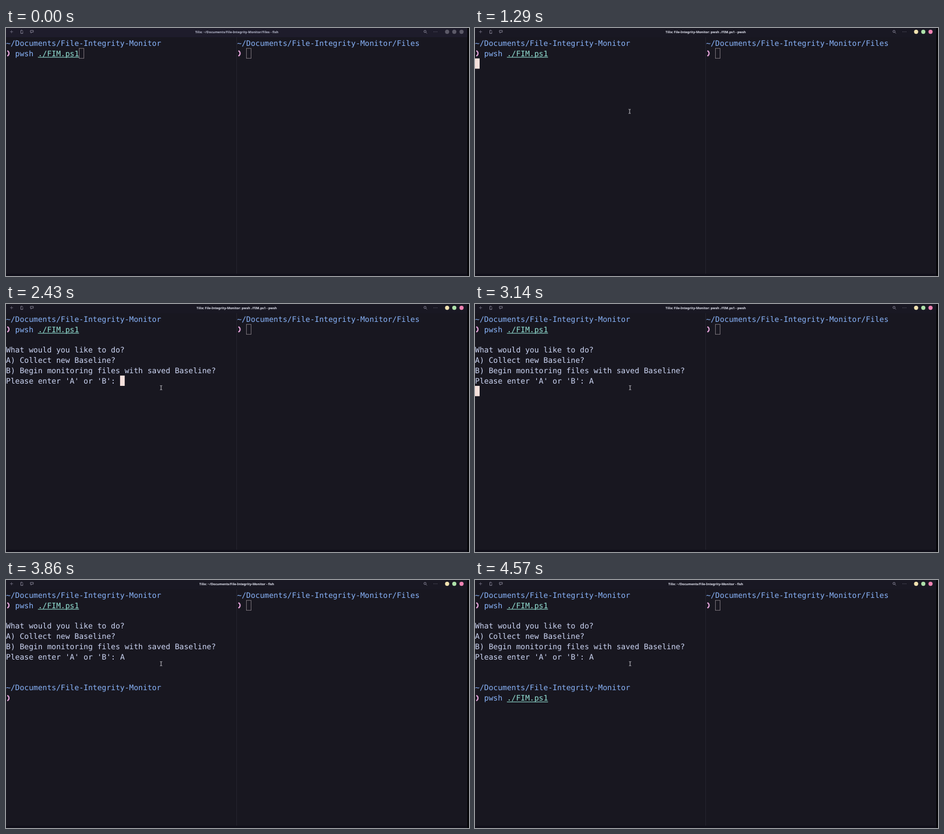
An HTML page that plays this animation: 800 px wide and 430 px high, repeating every 5000 ms.

```html
<!DOCTYPE html>
<html lang="en">
<head>
<meta charset="utf-8">
<title>Terminal session</title>
<style>
  html, body { margin: 0; width: 100%; height: 100%; overflow: hidden; background: #11101a; }
  svg { display: block; width: 800px; height: 430px; }
  text { font: 13.1px "DejaVu Sans Mono", "Noto Sans Mono", monospace; white-space: pre; text-rendering: geometricPrecision; fill: #cdd6f4; }
  #title { font: 700 5.56px "Noto Sans", "Open Sans", sans-serif; text-anchor: middle; }
  .path, .cmd { fill: #89b4fa; }
  .file { fill: #94e2d5; }
  .line { fill: none; stroke: #94e2d5; }
  .mark { fill: none; stroke: #e6a5dc; stroke-width: 2; }
  .icons { fill: none; stroke: #9896a9; stroke-width: .8; }
  .hollow { fill: none; stroke: #8f878d; stroke-width: .8; }
  .solid { fill: #f5e0dc; }
</style>
</head>
<body>
<svg viewBox="0 0 800 430">
  <rect width="797" height="426" fill="#181720"/>
  <rect id="bar" width="797" height="16"/>
  <rect x="797" width="3" height="430" fill="#050508"/>
  <path d="M398.5 16V426" stroke="#25232f"/>
  <g class="icons">
    <path d="M7 6.5h5.2M9.6 3.9v5.2" stroke="#706e80"/>
    <path d="M28 4h-2.4v5.4h3.4V7M27.5 4.2l2.2 1.6"/>
    <path d="M42.2 4.2h5v3h-2.6l-1.4 1.7V7.2h-1z"/>
    <circle cx="724" cy="6" r="1.9"/>
    <path d="M725.4 7.4l2 2"/>
    <path d="M738.8 6.6h6.4" stroke="#706e80" stroke-dasharray="1.2 1.4"/>
  </g>
  <g id="buttons">
    <circle cx="762.2" cy="6.6" r="3.6"/>
    <circle cx="774.6" cy="6.6" r="3.6"/>
    <circle cx="787.1" cy="6.6" r="3.6"/>
  </g>
  <text id="title" x="398.6" y="8.6"></text>
  <g id="screen"></g>
  <rect id="cursor"/>
  <path id="pointer" d="M-1.8 -3.6Q-.2 -3.6 0 -2.9Q.2 -3.6 1.8 -3.6M0 -3V3M-1.8 3.6Q-.2 3.6 0 2.9Q.2 3.6 1.8 3.6" fill="none" stroke="#d8d8de" stroke-width=".9"/>
</svg>
<script>
const LOOP = 5000, CELL = 7.885, ROW = 17.85, TOP = 17, RIGHT = 399.3;
const HOME = "~/Documents/File-Integrity-Monitor";
const $ = id => document.getElementById(id);
const screen = $("screen"), cursor = $("cursor"), pointer = $("pointer");
const buttons = [...$("buttons").children];

const rowY = row => TOP + row * ROW;
const baseline = row => rowY(row) + 13.8;
const text = (cls, col, row, str, x = 0) =>
  `<text class="${cls}" x="${x + col * CELL}" y="${baseline(row)}">${str}</text>`;

const prompt = (row, path, x = 0) => text("path", 0, row, path, x) +
  `<path class="mark" transform="translate(${x} ${rowY(row + 1)})" d="M2.2 4.6Q5.2 6.2 5.2 9.2T2.2 13.8"/>`;

const command = row => text("cmd", 2, row, "pwsh") + text("file", 7, row, "./FIM.ps1") +
  `<path class="line" d="M${7 * CELL} ${rowY(row) + 15.9}h${9 * CELL}"/>`;

const menu = [
  "What would you like to do?",
  "A) Collect new Baseline?",
  "B) Begin monitoring files with saved Baseline?",
  "Please enter 'A' or 'B': "
].map((s, i) => text("out", 0, 3 + i, s)).join("");

// Pieces of screen content, each shown from its start time on
const layers = [
  [0, prompt(0, HOME) + command(1) + prompt(0, HOME + "/Files", RIGHT) +
    `<rect class="hollow" x="${RIGHT + 2 * CELL + .3}" y="${rowY(1) + .4}" width="8" height="17.4"/>`],
  [1430, menu],
  [2710, text("out", 25, 6, "A")],
  [3290, prompt(9, HOME)],
  [4000, command(10)]
].map(([start, html]) => {
  const g = document.createElementNS("http://www.w3.org/2000/svg", "g");
  g.innerHTML = html;
  screen.append(g);
  return { start, g };
});

const titles = [
  [0, `Tilix: ${HOME}/Files - fish`],
  [570, `Tilix: ${HOME} - fish`],
  [1290, "Tilix: File-Integrity-Monitor: pwsh ./FIM.ps1 - pwsh"],
  [3290, `Tilix: ${HOME} - fish`]
];

// start, column, row, visible
const cursors = [
  [0, 16, 1, 1], [1290, 0, 2, 1], [1430, 25, 6, 1], [1860, 25, 6, 0],
  [2430, 25, 6, 1], [2710, 26, 6, 1], [3140, 0, 7, 1], [3290, 2, 10, 1],
  [3860, 2, 10, 0], [4000, 16, 10, 1], [4570, 16, 10, 0]
];

// start, x, y
const pointers = [[0, -20, -20], [140, 511, 167], [290, 262, 153], [430, 267.2, 144.6], [1860, 268, 145.2]];

const at = (list, t) => list.findLast(item => item[0] <= t);
const show = (el, on) => el.setAttribute("visibility", on ? "visible" : "hidden");
const set = (el, attrs) => Object.entries(attrs).forEach(([k, v]) => el.setAttribute(k, v));

function draw(t) {
  const focused = t >= 570;
  const colors = focused ? ["#f1e2b0", "#aee2aa", "#f283b4"] : Array(3).fill("#5c5a68");
  buttons.forEach((b, i) => b.setAttribute("fill", colors[i]));
  $("bar").setAttribute("fill", focused ? "#191823" : "#1e1c2b");
  $("title").style.fill = focused ? "#e4e6f2" : "#b9bccf";
  $("title").textContent = at(titles, t)[1];
  layers.forEach(({ start, g }) => show(g, t >= start));

  const [, col, row, on] = at(cursors, t);
  const inset = focused ? 0 : .4;
  set(cursor, {
    class: focused ? "solid" : "hollow",
    x: col * CELL + inset, y: rowY(row) + inset,
    width: 8, height: ROW - inset
  });
  show(cursor, on);

  const [, x, y] = at(pointers, t);
  pointer.setAttribute("transform", `translate(${x} ${y})`);
}

const begin = performance.now();
function tick() {
  draw((performance.now() - begin) % LOOP);
  requestAnimationFrame(tick);
}
tick();
</script>
</body>
</html>
```
